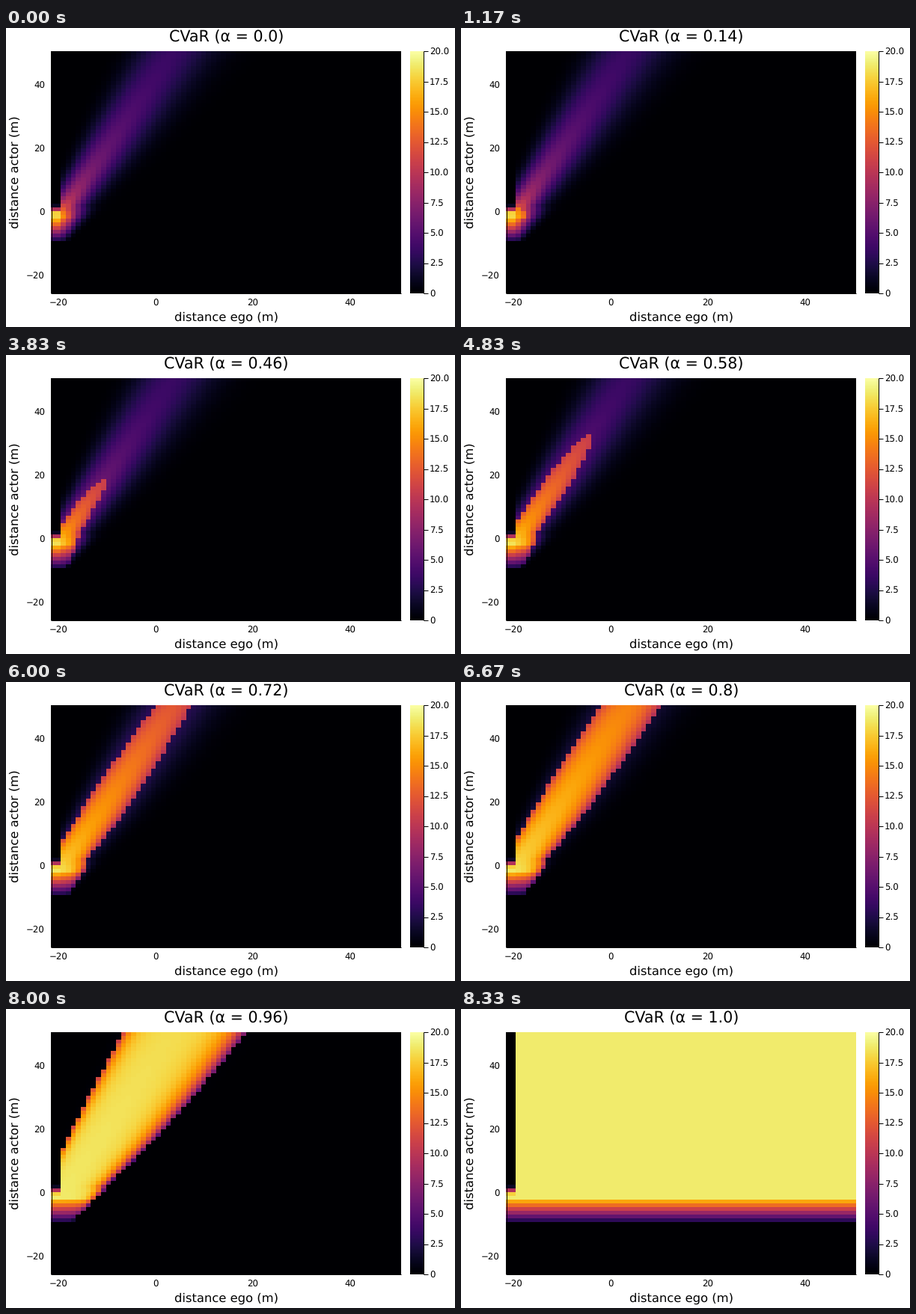
These frames come from a looping animation (600x400 px, 8490 ms). A matplotlib script:

```python
import numpy as np
import matplotlib.pyplot as plt
from matplotlib.animation import FuncAnimation

WIDTH, HEIGHT, DPI = 600, 400, 100
LOOP_MS, STEPS = 8490, 51
LEFT, RIGHT, TOP, BOTTOM = 60, 528, 31, 355
COLS, ROWS = 70, 65
BAR = (540, 558)
MAX_COST = 18.9
EGO_COLS = 2          # columns where the ego already blocks the crossing
LAST_FULL_ROW = 44    # below this row the cost fades out linearly

plt.rcParams["font.family"] = "DejaVu Sans"
plt.rcParams["text.hinting"] = "none"


def cell_centers(start, stop, count):
    step = (stop - start) / count
    return start + step * (np.arange(count) + 0.5)


row = np.arange(ROWS)[:, None]
x = cell_centers(LEFT, RIGHT, COLS)[None, :]
rise = 250 - cell_centers(TOP, BOTTOM, ROWS)[:, None]   # height above the base
up = np.maximum(rise, 0)
run = np.maximum(x - 74, 0)


def ridge_offset():
    """Signed distance from the ridge, in standard deviations."""
    ridge = 47 + 0.688 * up
    above = np.log((x - 25) / ridge) * (3.6 + 0.0068 * up)
    below = run / np.maximum(20 + 0.4 * rise, 6)
    return np.where(rise > 10, above, below)


def worst_cost():
    fading = 18.6 - 2.58 * (row - LAST_FULL_ROW)
    cost = np.where(row <= LAST_FULL_ROW, MAX_COST, fading)
    return np.where(cost > 1, cost, 0) * np.ones((1, COLS))


offset = ridge_offset()
peak = 1 / (1.02 + 0.0103 * up - 6e-6 * up**2)
prob = np.maximum(peak * np.exp(-offset**2 / 2), 1e-30)
worst = worst_cost()
# Late, grazing collisions on the right of the ridge cost less.
late = np.clip(offset, 0, 2.5)
mean_cost = worst * (0.57 + 0.28 * np.exp(-(up + run) / 20) - 0.06 * late**2)


def cvar(alpha):
    """Mean of the costs at or above the alpha quantile."""
    hit = prob > 1 - alpha
    share = np.where(hit, (1 - alpha) / prob, 0)
    tail = worst - (worst - mean_cost) * share**1.2
    values = np.where(hit, tail, prob * mean_cost)
    ego = worst[:, 0].copy()
    ego[:41] = 0
    ego[41:45] = 1.3, 9.5, 17.8, 17.9 + alpha
    values[:, :EGO_COLS] = ego[:, None]
    return values


fig = plt.figure(figsize=(WIDTH / DPI, HEIGHT / DPI), dpi=DPI, facecolor="white")
ax = fig.add_axes([0, 0, 1, 1])


def label(px, baseline, text, size, ha="center", **kw):
    return ax.text(px, baseline, text, fontsize=size * 72 / DPI, ha=ha,
                   va="baseline", color="black", **kw)


def line(xs, ys):
    ax.plot(xs, ys, color="black", lw=0.72, solid_capstyle="butt")


style = dict(cmap="inferno", vmin=0, vmax=20, aspect="auto",
             interpolation="nearest")
heat = ax.imshow(cvar(0), extent=(LEFT, RIGHT, BOTTOM, TOP), **style)
ax.imshow(np.linspace(20, 0, 256)[:, None],
          extent=(*BAR, BOTTOM, TOP), **style)
ax.set(xlim=(0, WIDTH), ylim=(HEIGHT, 0))
ax.axis("off")

line([LEFT + 0.5, LEFT + 0.5], [TOP, BOTTOM])
line([LEFT, RIGHT], [BOTTOM, BOTTOM])
line([BAR[1], BAR[1]], [TOP, BOTTOM])

for value in (-20, 0, 20, 40):
    text = str(value).replace("-", "\u2212")
    label(200 + 6.5 * value, 371.5, text, 11.8)
    label(52, 251 - 4.26 * value, text, 11.8, ha="right")

for k in range(9):
    py = BOTTOM - k * (BOTTOM - TOP) / 8
    line([BAR[1], BAR[1] + 6], [py, py])
    label(566, py + 4.4, str(2.5 * k) if k else "0", 11.8, ha="left")

label(294.5, 392, "distance ego (m)", 16.4)
label(17, 193, "distance actor (m)", 16.4, rotation=90, rotation_mode="anchor")
title = label(294.5, 18, "", 20.6)


def draw(step):
    alpha = round(step / (STEPS - 1), 2)
    heat.set_data(cvar(alpha))
    title.set_text(f"CVaR (α = {alpha})")
    return heat, title


anim = FuncAnimation(fig, draw, frames=STEPS, interval=LOOP_MS / STEPS,
                     repeat=True, repeat_delay=0)
plt.show()
```
